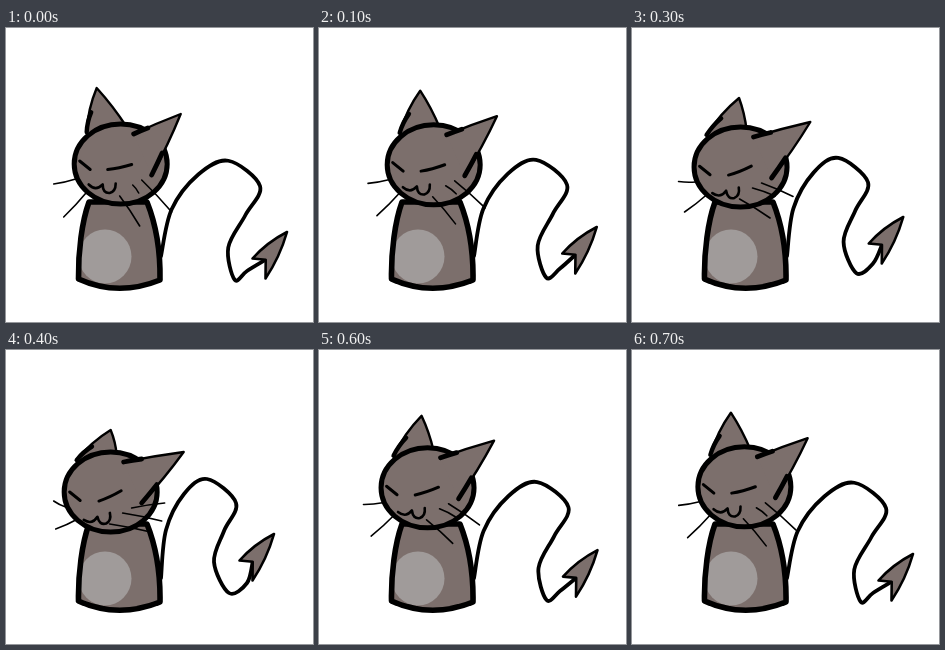
Recreate the animation shown at these times as an HTML page. Size 307x294 px, loop 800 ms.

```html
<!DOCTYPE html>
<html lang="en">
<head>
<meta charset="utf-8">
<title>Cat with a swaying tail</title>
<style>
html, body { margin: 0; width: 100%; height: 100%; overflow: hidden; background: #fff; }
svg { display: block; width: 100vw; height: 100vh; }
path, ellipse, use { stroke-linecap: round; stroke-linejoin: round; }
.fur { fill: #7c6f6c; }
.line { fill: none; stroke: #000; }
.edge { stroke: #000; }
</style>
</head>
<body>
<svg viewBox="0 0 307 294">
  <defs>
    <path id="torso" d="M83 174C76 193 72 224 72.5 251Q112 269 154 252C154.500 222 149 194 141 174Z"/>
    <clipPath id="inside"><use href="#torso"/></clipPath>
  </defs>
  <path id="tail" class="line" stroke-width="3.8"/>
  <path id="arrow" class="fur edge" stroke-width="2.6"/>
  <use href="#torso" class="fur"/>
  <ellipse cx="99" cy="228.500" rx="26.500" ry="27" fill="#a09b9a" clip-path="url(#inside)"/>
  <use href="#torso" class="line" stroke-width="5.6"/>
  <g id="head">
    <path id="earL" class="fur"/>
    <path id="earLEdge" class="line" stroke-width="2.4"/>
    <path id="earLBase" class="line" stroke-width="4.4"/>
    <ellipse class="fur edge" rx="46.500" ry="40" stroke-width="5"/>
    <path id="earR" class="fur"/>
    <path id="earREdge" class="line" stroke-width="2.4"/>
    <path id="earRBase" class="line" stroke-width="4.8"/>
    <path id="whiskers" class="line" stroke-width="1.6"/>
    <path id="brow" class="line" stroke-width="3" d="M0 0L10.500 8.500"/>
    <g id="face">
      <path class="line" stroke-width="3" d="M6 -16Q17 -17 30 -21"/>
      <path class="line" stroke-width="2.6" d="M-13 -1Q-6 6 1 -1Q1 8 8 7.500Q14 6 14 -2"/>
    </g>
  </g>
</svg>
<script>
const STEP = 100, COUNT = 8, LOW = 4;

// Tail at its innermost; the sway pushes it outwards from here.
const tailRest = [[155, 228], [160, 180], [178, 144], [201, 129], [230, 153], [218, 181], [208, 212], [223, 243], [241, 233]];
const tipRest = [268, 184];

// Root, tip with the head low, tip with the head high; all from the head's centre.
const whiskers = [
  [[-45, 15], [-57, 9], [-67, 20]],
  [[-33, 27], [-55, 37], [-57, 53]],
  [[21, 16], [54, 11], [51, 48]],
  [[12, 21], [51, 29], [18, 29]],
  [[-1, 32], [40, 40], [19, 62]]
];

const $ = id => document.getElementById(id);
const set = (id, d) => $(id).setAttribute("d", d);
const move = (id, at, turn = 0) => $(id).setAttribute("transform", `translate(${at}) rotate(${turn})`);
const mix = (a, b, k) => a.map((v, i) => v + (b[i] - v) * k);
const add = (a, x, y) => [a[0] + x, a[1] + y];

// Curve from a to b; bend pushes its middle sideways.
function bow(a, b, bend) {
  const dx = b[0] - a[0], dy = b[1] - a[1], len = Math.hypot(dx, dy);
  const c = add(mix(a, b, .5), -dy / len * bend, dx / len * bend);
  return `M${a}Q${c} ${b}`;
}
const join = (first, ...rest) => first + rest.map(d => d.replace(/^M/, "L")).join("");

function spline(pts) {
  let d = "M" + pts[0];
  for (let i = 0; i < pts.length - 1; i++) {
    const a = pts[i], b = pts[i + 1], before = pts[i - 1] || a, after = pts[i + 2] || b;
    const c1 = add(a, (b[0] - before[0]) / 6, (b[1] - before[1]) / 6);
    const c2 = add(b, (a[0] - after[0]) / 6, (a[1] - after[1]) / 6);
    d += `C${c1} ${c2} ${b}`;
  }
  return d;
}

// Ear with its edge heavier near the base.
function drawEar(id, base1, tip, base2, bend, heavy1, heavy2) {
  const edge = join(bow(base1, tip, bend), bow(tip, base2, -2));
  set(id, edge);
  set(id + "Edge", edge);
  const part = (base, k, b) => k ? bow(base, mix(base, tip, k), b * k * k) : "";
  const lift = add(mix(base1, tip, heavy1), 0, 0);
  set(id + "Base", bow(base1, lift, bend * heavy1) + part(base2, heavy2, 2));
}

function drawTail(sway) {
  const pts = tailRest.map((p, i) => {
    const u = i / (tailRest.length - 1);
    return add(p, 24 * sway * Math.sin(Math.PI * u) ** 1.5, 10 * sway * u);
  });
  const tip = add(tipRest, 13 * sway, 20 * sway);
  const left = add(tip, -34.5, 26.5), right = add(tip, -21.5, 46.5);
  const notch = mix(mix(left, right, .5), tip, .24);
  set("tail", spline([...pts, notch]));
  set("arrow", join(bow(tip, left, 4), "M" + notch, bow(right, tip, 4)) + "Z");
}

function drawHead(step, rise) {
  const lift = Math.sqrt(rise);
  // The sideways lean lags half a step behind the nod.
  const lean = (.5 + .5 * Math.cos((step - .5) / COUNT * 2 * Math.PI)) ** .7;
  move("head", [103.5 + 11.5 * lean, 142 - 6 * lift]);
  drawEar("earL", [-34, -32], [-24 * rise ** 2, -62 - 14 * lift], [6, -37], -4, .45, 0);
  drawEar("earR", [13, -30], [73 - 13 * rise, -40 - 10 * lift], [31, 11], -1, .3, .36);
  set("whiskers", whiskers.map(([root, low, high]) => bow(root, mix(low, high, lift), -1)).join(""));
  move("brow", [-41, -3 * rise]);
  move("face", [-14 - 5 * rise, 26 - 4.5 * rise], -13 * (1 - rise));
}

function draw(step) {
  const rise = Math.abs(step - LOW) / LOW;
  const back = (step - LOW) / (COUNT - 1 - LOW);
  drawTail(step < LOW ? rise : 1 - (1 - back) ** 1.5);
  drawHead(step, rise);
}

const start = performance.now();
function tick() {
  draw(Math.floor((performance.now() - start) / STEP) % COUNT);
  requestAnimationFrame(tick);
}
tick();
</script>
</body>
</html>
```
